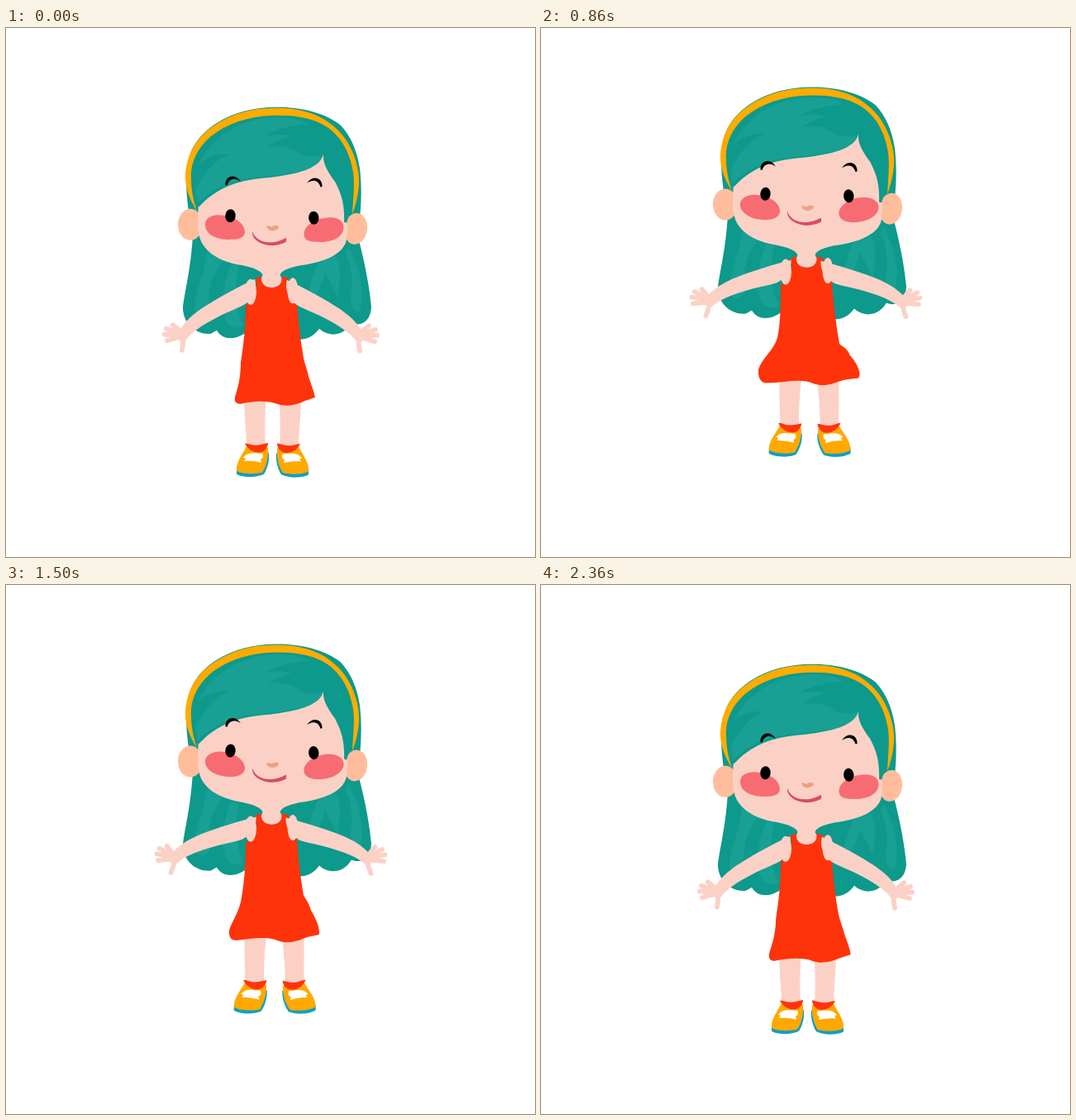
An HTML page for the animation above (2.43 s loop, 640x640 px).

```html
<!DOCTYPE html>
<html lang="en">
<head>
<meta charset="utf-8">
<title>Jumping girl</title>
<style>
  html, body { margin: 0; width: 100%; height: 100%; overflow: hidden; background: #fff; }
  svg { display: block; width: 100%; height: 100%; }
  .dark { fill: #0d998b; }
  .light { fill: #17a093; }
  .skin { fill: #fbd1c6; }
  .ear { fill: #ffbd9c; }
  .red { fill: #ff330a; }
  .fingers { fill: none; stroke: #fbd1c6; stroke-width: 5.8; stroke-linecap: round; }
</style>
</head>
<body>
<svg viewBox="0 0 640 640">
  <defs>
    <g id="leg">
      <path class="skin" d="M288 440C288 470 291 490 291 506H314C313 485 313 468 315 440Z"/>
      <path fill="#10a0be" d="M279 533V540C285 544 302 545 312 540C317 532 319 522 318 514Z"/>
      <path fill="#ffa800" d="M291 506C287 515 278 525 279 536C285 540 300 540 310 538C315 530 318 520 317 508Z"/>
      <path class="red" d="M289 503C292 502 296 505 302 505C308 505 313 503 317 502C317 507 314 511 310 513C302 515 294 512 289 503Z"/>
      <path fill="#fff" d="M290 517C296 513 304 515 310 515C312 518 311 521 308 522L309 526C300 524 296 524 288 524L290 521L287 520Z"/>
    </g>
  </defs>
  <g id="girl">
    <path class="dark" d="M330 96C290 95 245 110 226 145C214 170 217 205 226 250C224 290 216 320 214 338C214 360 232 372 248 370L255 366C262 379 280 378 292 367L355 377C366 377 374 371 379 364C390 374 408 374 418 357C430 362 441 355 442 338C440 315 434 282 425 250C430 225 431 195 428 170C424 145 416 130 405 118C385 102 355 96 330 96Z"/>
    <path class="light" d="M243 270C240 300 228 318 228 340C230 354 240 355 246 345C244 322 246 300 264 280ZM272 286C262 315 258 340 268 358C274 364 284 364 288 360C278 345 276 315 282 288ZM377 285C368 305 364 325 369 330C378 322 383 308 386 296C391 305 398 318 401 327C405 305 406 288 399 276ZM415 265C430 295 434 322 428 343C420 345 417 335 417 325C420 305 418 285 410 272Z"/>

    <g id="legL"><use href="#leg"/></g>
    <g id="legR"><use href="#leg" transform="translate(645 .5) scale(-1 1)"/></g>

    <path id="dress" class="red"/>
    <path class="skin" d="M311 285V298L309 303C308 318 335 318 333.500 303L331 298V285Z"/>
    <g id="arm">
      <path class="skin" d="M301 304C280 314 252 329 236 340C226 347 217 355 211 365L207 375L217 379C224 368 240 358 262 347C275 341 288 336 291 333C300 325 304 314 301 304Z"/>
      <ellipse class="skin" cx="211" cy="371" rx="7" ry="7"/>
      <path class="fingers" d="M211 367L202 359.500M209 369L194 364M209 371H192M210 374L195 378.500M214 373Q215 382 213 390"/>
    </g>
    <use href="#arm" transform="translate(641 1) scale(-1 1)"/>
    <ellipse class="skin" cx="296" cy="319.500" rx="7" ry="15.500"/>
    <ellipse class="skin" cx="347" cy="318" rx="6.500" ry="15.500"/>

    <ellipse class="ear" cx="223" cy="238" rx="15" ry="19"/>
    <ellipse class="ear" cx="423" cy="243" rx="14" ry="19" transform="rotate(8 423 243)"/>
    <path class="skin" d="M233 210C232 230 231 245 235 256C243 276 266 284 284 287C300 290 309 294 311 300H331C333 293 345 289 360 287C385 283 405 275 411 260C415 245 412 220 408 205L384 140L240 180Z"/>
    <path class="dark" d="M233 217C224 195 216 165 230 142C250 110 295 99 330 99C380 99 420 130 426 170L424 200L412 236L409 235C410 210 404 198 398 186C390 175 383 165 384 153C378 172 350 177 320 181C290 183 258 189 233 217Z"/>
    <path class="light" d="M229 196C238 180 248 162 270 153C255 152 242 156 232 166C245 138 275 113 318 109C338 107 358 110 367 117C350 117 326 122 313 131C325 129 337 128 346 131C336 133 325 138 317 144C333 141 350 146 358 154C366 156 376 156 383 155C378 172 350 175 320 179C290 181 258 186 232 212Z"/>
    <path fill="#ffab00" d="M231 222C222 207 217 195 217 180C218 150 233 127 262 112C285 100 305 97 330 97C362 97 392 108 411 135C424 155 428 175 427 190C426 205 422 217 419 226C420 205 422 190 420 175C416 150 405 130 385 118C370 109 350 106 330 106C300 106 270 113 247 132C230 147 223 165 224 182C224 200 228 212 231 222Z"/>

    <path id="cheek" fill="#f76c72"/>
    <use href="#cheek" transform="translate(649.500 3) scale(-1 1)"/>
    <g id="eyes">
      <ellipse cx="271.500" cy="227.300" rx="6.200" ry="8" transform="rotate(5 271.500 227.300)"/>
      <ellipse cx="372.300" cy="229.800" rx="6.200" ry="8" transform="rotate(-5 372.300 229.800)"/>
    </g>
    <g id="brows">
      <path id="brow" d="M265.500 190C265 179 277 175.500 284 186C277 181 270 182 267.500 190.500Z"/>
      <use href="#brow" transform="translate(648 2) scale(-1 1)"/>
    </g>
    <path fill="#eca283" d="M315 240C318 238 320 242 323 240C326 238 330 239 330 242C326 247 317 247 315 240Z"/>
    <path fill="#d94c68" d="M298 246C301 255 309 259.500 319 259.500C327 259.500 333 257 339 254V259C331 263 325 264 317 263C306 261 297 255 298 246Z"/>
  </g>
</svg>
<script>
const LOOP = 2430, FPS = 14, JUMP = 1200;
const el = id => document.getElementById(id);
const move = (id, value) => el(id).setAttribute('transform', value);

const dress = [
  'M302 303C304 318 303 334 290 335C290 365 287 385 284 405C284 425 280 437 277 447C276 453 279 455 284 455C296 452 316 450 328 455C340 459 350 456 358 453C364 450 370 449 374 447C371 434 366 424 365 417C362 407 360 402 359 393C356 375 353 350 352 332C342 332 339 320 342 303L333 301C336 318 307 319 309 301Z',
  'M302 303C304 318 303 334 290 335C290 365 289 385 286 399C282 415 268 425 264 438C263 448 267 454 274 454C296 453 316 448 328 454C340 459 350 456 358 453C368 449 375 449 383 448C388 443 381 429 373 420C371 414 368 411 361 406C356 378 353 350 352 332C342 332 339 320 342 303L333 301C336 318 307 319 309 301Z'
];
const cheek = [
  'M241 238C241 229 251 225 263 227C279 229 289 238 289 247C289 254 282 256 273 256C258 257 241 252 241 238Z',
  'M241 237C242 229 253 224 267 227C281 230 290 239 289 247C288 255 277 258 264 256C250 254 240 246 241 237Z'
];

// Blends two paths that share the same commands.
function blend(id, [from, to], k) {
  const ends = to.match(/\d+/g);
  let i = 0;
  el(id).setAttribute('d', from.replace(/\d+/g, a => (+a + (ends[i++] - a) * k).toFixed(2)));
}

const ease = k => (1 - Math.cos(Math.PI * Math.min(1, Math.max(0, k)))) / 2;

// The skirt puffs out on the first landing, then settles slowly.
const flare = n => n < 12 ? 1.07 * ease((n - 9) / 3) : Math.max(.08, 1.07 * ease((30 - n) / 18));

function draw(now) {
  const n = Math.floor((now % LOOP + 5) * FPS / 1000);
  const t = n * 1000 / FPS + 22;
  const lift = (1 - Math.cos(2 * Math.PI * t / JUMP)) / 2;
  move('girl', `translate(0 ${-44 * lift})`);
  move('arm', `rotate(${20 * lift} 296 312)`);
  move('legL', `rotate(${4.4 * lift} 302 460)`);
  move('legR', `rotate(${-6.3 * lift} 343 396)`);
  move('eyes', `translate(0 ${-4 * lift})`);
  move('brows', `translate(0 ${10.5 * lift})`);
  blend('dress', dress, flare(n));
  blend('cheek', cheek, Math.min(1, 1.8 * lift));
  requestAnimationFrame(() => draw(performance.now()));
}
draw(0);
</script>
</body>
</html>
```
